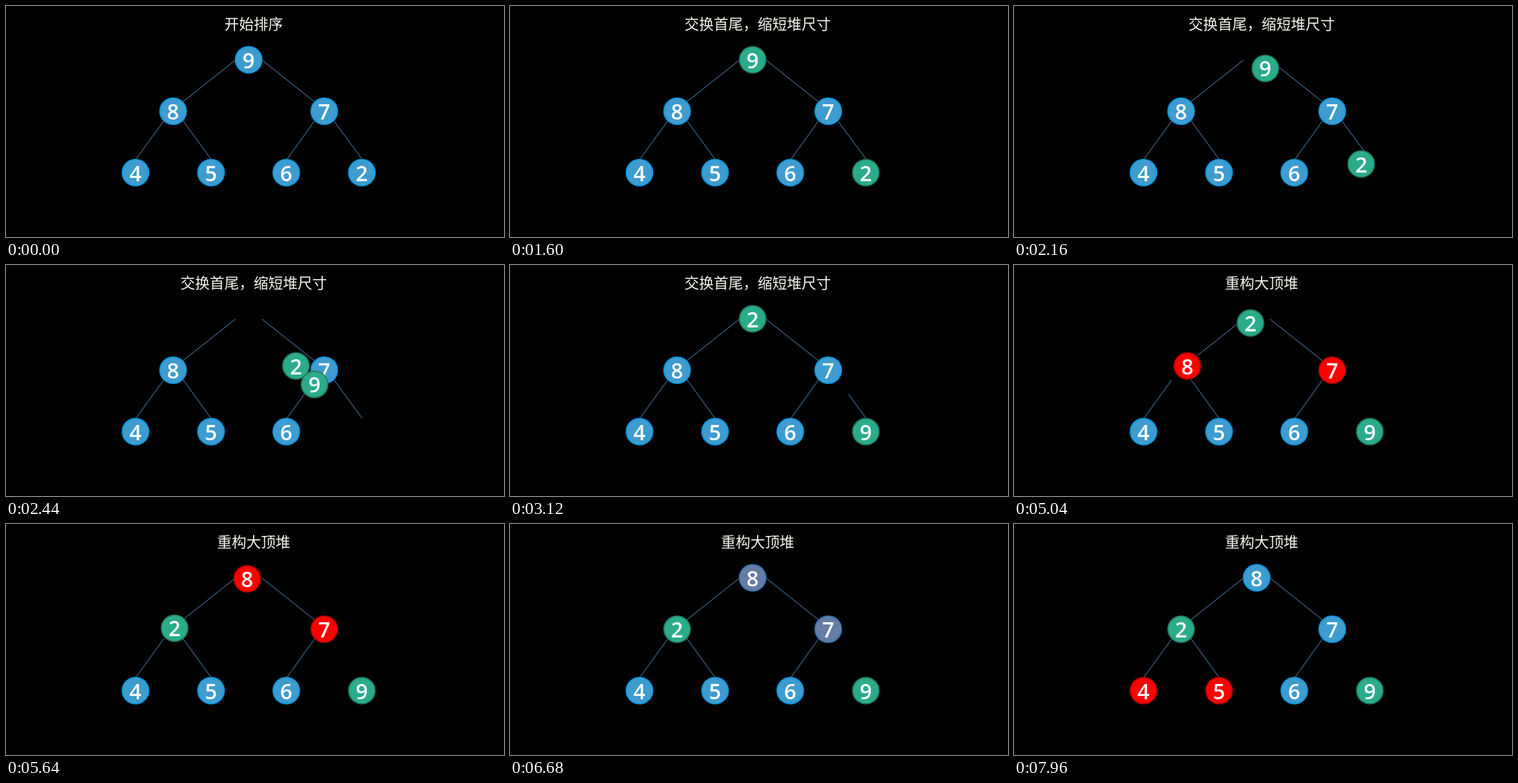
Recreate the animation shown at these times as an HTML page with a canvas. Size 748 by 348 pixels, loop 8 s.

```html
<!DOCTYPE html>
<html lang="zh-CN">
<head>
<meta charset="utf-8">
<title>堆排序</title>
<style>
html, body { margin: 0; width: 100%; height: 100%; overflow: hidden; background: #000; }
canvas { display: block; }
</style>
</head>
<body>
<canvas id="stage" width="748" height="348"></canvas>
<script>
const ctx = document.getElementById('stage').getContext('2d');
const LOOP = 8000;

// Each style: fill and border as RGB.
const BLUE = [[62, 156, 207], [8, 152, 226]];
const GREEN = [[42, 172, 138], [38, 116, 92]];
const RED = [[255, 0, 0], [176, 0, 0]];

const SLOTS = {
  root: [364.5, 81],
  left: [251, 158.5], right: [478, 158.5],
  leaf1: [194.5, 251], leaf2: [308, 251], leaf3: [421, 251], leaf4: [534.5, 251]
};

const EDGES = [
  [344.5, 81.5, 266, 144], [384.5, 81.5, 463, 144],
  [237, 173, 195, 231], [266, 173, 308, 231],
  [463.5, 173, 422, 231], [492.5, 173, 535, 231]
];

// Time windows of the animation steps.
const PICK_ENDS = [700, 1270];
const SWAP_ENDS = [1875, 2945];
const CUT_EDGE = [2920, 3450];
const PICK_CHILDREN = [3620, 4190];
const SWAP_CHILD = [4745, 5825];
const RELEASE = [6260, 6790];
const PICK_LEAVES = [7340, 7760];

// Drawn from back to front.
const NODES = [
  { digit: 4, slot: 'leaf1', paints: [[PICK_LEAVES, RED]] },
  { digit: 5, slot: 'leaf2', paints: [[PICK_LEAVES, RED]] },
  { digit: 6, slot: 'leaf3' },
  { digit: 7, slot: 'right', paints: [[PICK_CHILDREN, RED], [RELEASE, BLUE]] },
  { digit: 8, slot: 'left', paints: [[PICK_CHILDREN, RED], [RELEASE, BLUE]],
    moves: [[SWAP_CHILD, 'root']] },
  { digit: 2, slot: 'leaf4', paints: [[PICK_ENDS, GREEN]],
    moves: [[SWAP_ENDS, 'root'], [SWAP_CHILD, 'left']] },
  { digit: 9, slot: 'root', paints: [[PICK_ENDS, GREEN]],
    moves: [[SWAP_ENDS, 'leaf4']] }
];

const progress = (t, [start, end]) => Math.min(1, Math.max(0, (t - start) / (end - start)));
const ease = p => p < 0.5 ? 4 * p ** 3 : 1 - 4 * (1 - p) ** 3;
const mix = (a, b, p) => a.map((v, i) => v + (b[i] - v) * p);
const rgb = c => `rgb(${c.map(Math.round).join(',')})`;

function drawTitle(text, alpha) {
  if (alpha <= 0) return;
  ctx.globalAlpha = alpha;
  ctx.fillStyle = '#f6f6ee';
  ctx.font = '22px "Noto Sans CJK SC", "Noto Sans CJK", sans-serif';
  ctx.fillText(text, 372, 35);
  ctx.globalAlpha = 1;
}

function drawEdges(t) {
  ctx.strokeStyle = '#4f8fc4';
  ctx.lineWidth = 1;
  EDGES.forEach(([x1, y1, x2, y2], i) => {
    const cut = i === EDGES.length - 1 ? progress(t, CUT_EDGE) : 0;
    if (cut === 1) return;
    ctx.beginPath();
    ctx.moveTo(...mix([x1, y1], [x2, y2], cut));
    ctx.lineTo(x2, y2);
    ctx.stroke();
  });
}

function drawNode({ digit, slot, paints = [], moves = [] }, t) {
  let position = SLOTS[slot];
  for (const [span, to] of moves) position = mix(position, SLOTS[to], ease(progress(t, span)));
  let colors = BLUE;
  for (const [span, to] of paints) {
    const p = progress(t, span);
    colors = colors.map((c, i) => mix(c, to[i], p));
  }
  const [x, y] = position;
  const [fill, border] = colors.map(rgb);
  ctx.beginPath();
  ctx.arc(x, y, 19.9, 0, Math.PI * 2);
  ctx.fillStyle = fill;
  ctx.fill();
  ctx.strokeStyle = border;
  ctx.lineWidth = 1.8;
  ctx.stroke();
  ctx.fillStyle = '#fff';
  ctx.font = '600 32px "Open Sans", "Noto Sans", sans-serif';
  ctx.fillText(digit, x, y + 12.5);
}

function draw(t) {
  ctx.fillStyle = '#000';
  ctx.fillRect(0, 0, 748, 348);
  ctx.textAlign = 'center';
  const second = progress(t, PICK_ENDS);
  const third = progress(t, PICK_CHILDREN);
  drawTitle('开始排序', 1 - second);
  drawTitle('交换首尾，缩短堆尺寸', second - third);
  drawTitle('重构大顶堆', third);
  drawEdges(t);
  NODES.forEach(node => drawNode(node, t));
}

function tick() {
  draw(performance.now() % LOOP);
  requestAnimationFrame(tick);
}
tick();
</script>
</body>
</html>
```
